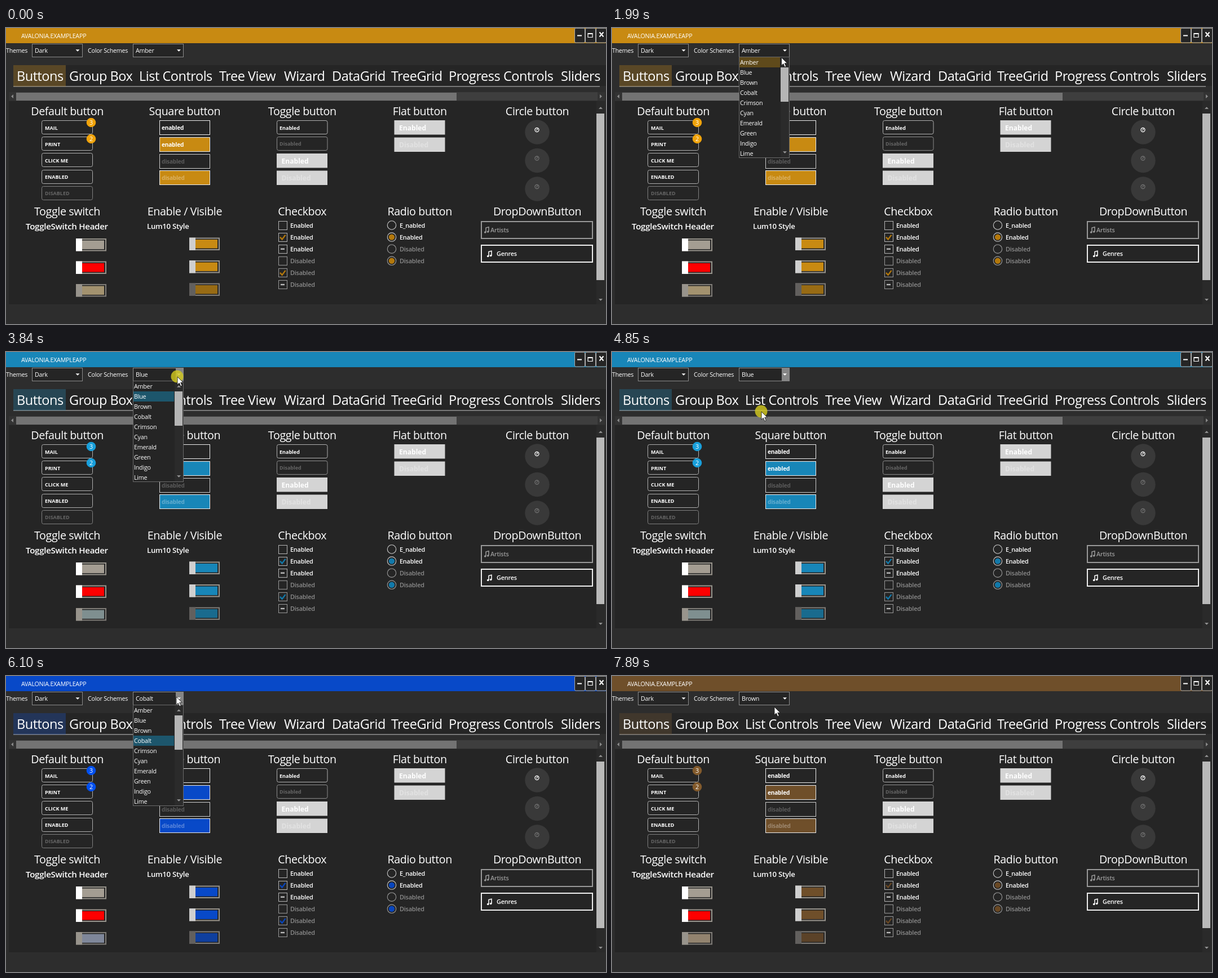
Animation, 1064 px wide and 526 px high, one loop 8 s. Source, as an HTML page:

```html
<!DOCTYPE html>
<html lang="en">
<head>
<meta charset="utf-8">
<title>Color schemes</title>
<style>
html, body { margin: 0; width: 100%; height: 100%; overflow: hidden; background: #2d2d2d; }
svg { display: block; width: 1064px; height: 526px; font-family: "Open Sans", "Noto Sans", sans-serif; }
text { fill: #fff; letter-spacing: -.02em; white-space: pre; }
.mid { text-anchor: middle; }
.head { font-size: 19.7px; }
.tab { font-size: 23.5px; }
.ui { font-size: 10.7px; font-weight: 500; }
.caps { font-size: 9px; font-weight: 700; letter-spacing: 0; }
.semi { font-size: 10.9px; font-weight: 600; }
.square { font-size: 10.1px; font-weight: 700; }
.flat { font-size: 12.1px; font-weight: 700; letter-spacing: 0; }
.title { font-size: 15.1px; font-weight: 600; }
.style { font-size: 13.2px; font-weight: 600; }
.main { fill: var(--main); }
.badge { fill: var(--badge); }
</style>
</head>
<body>
<svg id="stage" viewBox="0 0 1064 526"></svg>
<script>
const stage = document.getElementById('stage');

const rect = (x, y, w, h, attrs = '') =>
  `<rect x="${x}" y="${y}" width="${w}" height="${h}" ${attrs}/>`;
const frame = (x, y, w, h, color, fill = 'none', r = 0, line = 1) =>
  rect(x, y, w, h, `rx="${r}" fill="${fill}" stroke="${color}" stroke-width="${line}"`);
const text = (x, y, s, cls, color = '#fff') =>
  `<text x="${x}" y="${y}" class="${cls}" style="fill:${color}">${s}</text>`;
const disc = (x, y, r, attrs) => `<circle cx="${x}" cy="${y}" r="${r}" ${attrs}/>`;
const path = (d, attrs) => `<path d="${d}" ${attrs}/>`;
const caret = (x, y, dir, color, s = 3.5) =>
  path(`M${x - s} ${y - dir * s / 2}h${2 * s}l${-s} ${dir * s}z`, `fill="${color}"`);
const each = (list, fn) => list.map(fn).join('');

function windowChrome() {
  const buttons = each([1008, 1027, 1046], x => frame(x + .5, .5, 18, 25.5, '#a9a9a9', '#252525', 2));
  const glyphs = path('M1013 13.5h8', 'stroke="#fff" stroke-width="2"')
    + path('M1032 9.5h8v7h-8zM1032 10.5h8', 'fill="none" stroke="#fff" stroke-width="1.2"')
    + path('M1052.5 7.5l7 8m0-8l-7 8', 'stroke="#fff" stroke-width="2"');
  return rect(0, 0, 1064, 27, 'class="main"')
    + text(27, 18, 'AVALONIA.EXAMPLEAPP', 'ui') + buttons + glyphs;
}

function toolbar() {
  return text(0, 44, 'Themes', 'ui') + text(145, 44, 'Color Schemes', 'ui')
    + frame(46.5, 28.5, 89, 23, '#8c8c8c', '#252525') + text(51, 44, 'Dark', 'ui')
    + caret(127, 40, 1, '#fff')
    + frame(225.5, 28.5, 89, 23, '#8c8c8c', '#252525')
    + `<text id="scheme" class="ui" x="230" y="44"></text>`
    + rect(301, 29, 13.5, 22.5, 'id="hot" fill="#858585"') + caret(306.5, 40, 1, '#fff');
}

function tabs() {
  const labels = [[19, 'Buttons'], [112, 'Group Box'], [236, 'List Controls'], [378, 'Tree View'],
    [493, 'Wizard'], [578, 'DataGrid'], [683, 'TreeGrid'], [785, 'Progress Controls'], [984, 'Sliders']];
  return rect(13, 66, 1051, 37, 'fill="#252525"')
    + rect(13, 103, 1040, 1.6, 'fill="#8a8a8a"')
    + rect(13, 66, 93, 37, 'fill="#2d2d2d"')
    + rect(13, 66, 93, 38, 'class="main" opacity=".28"')
    + each(labels, ([x, s]) => text(x, 94, s, 'tab'));
}

function scrollBars() {
  return rect(5, 114, 1057, 15, 'fill="#333"') + rect(18, 114, 1031, 15, 'fill="#3e3e3e"')
    + rect(18, 115, 781, 14, 'fill="#737373"')
    + path('M13 118v7l-4-3.5zM1053 118v7l4-3.5z', 'fill="#888"')
    + rect(5, 130, 1057, 361, 'fill="#252525"')
    + rect(1047, 130, 15, 361, 'fill="#2a2a2a"') + rect(1047, 152, 14, 296, 'fill="#b9b9b9"')
    + caret(1054.5, 142, -1, '#999') + caret(1054.5, 483, 1, '#999');
}

function headings() {
  const rows = [['Default button', 'Square button', 'Toggle button', 'Flat button', 'Circle button'],
    ['Toggle switch', 'Enable / Visible', 'Checkbox', 'Radio button', 'DropDownButton']];
  return each(rows, (row, r) => each(row, (s, i) =>
    text(108.5 + i * 208.4, r ? 333 : 155, s, 'head mid')));
}

function pushButtons() {
  const names = ['MAIL', 'PRINT', 'CLICK ME', 'ENABLED', 'DISABLED'];
  const normal = each(names, (s, i) => {
    const y = 164.5 + i * 29.2, off = i == 4;
    return frame(63.5, Math.floor(y) + .5, 90, 24, off ? '#808080' : '#b0b0b0', '#252525', 3)
      + text(69, y + 16, s, 'caps', off ? '#666' : '#fff');
  });
  const badges = each([[168, 3], [197, 2]], ([y, n]) =>
    disc(151, y, 8.3, 'class="badge"') + text(151, y + 3.8, n, 'ui mid'));
  const square = each([164, 194, 224, 253], (y, i) =>
    frame(272.5, y + .5, 89, 25, i == 2 ? '#ccc' : '#eee', i % 2 ? 'var(--main)' : '#252525')
    + text(276, y + 17, i < 2 ? 'enabled' : 'disabled', 'square',
      i < 2 ? '#fff' : i == 2 ? '#5a5a5a' : 'rgba(255,255,255,.33)'));
  const toggle = each(['Enabled', 'Disabled'], (s, i) =>
    frame(480.5, 164.5 + i * 29, 89.5, 24, i ? '#8c8c8c' : '#b0b0b0', '#252525', 3)
    + text(485, 180.5 + i * 28.5, s, 'caps', i ? '#666' : '#fff'));
  const flat = each([[480, 223], [688.5, 164]], ([x, y]) =>
    each(['Enabled', 'Disabled'], (s, i) =>
      rect(x, y + i * 30.5, 90, 25.5, 'fill="#d4d4d4"')
      + text(x + 8.5, y + 17.5 + i * 30.5, s, 'flat', i ? '#e2e2e2' : '#fff')));
  const round = each([185, 235.5, 286], (y, i) => {
    const color = i ? '#727272' : '#fff';
    return disc(942, y, 21.7, 'fill="#393939"')
      + disc(941.5, y - 4, 3.5, `fill="none" stroke="${color}" stroke-width="1.3"`)
      + path(`M940.5 ${y - 3}l2.5-2.8`, `stroke="${color}" stroke-width="1.2"`);
  });
  return normal + badges + square + toggle + flat + round;
}

function toggleSwitch(x, y, fill, knob, edge = '#98948c') {
  return frame(x + 1, y + 1, 52, 20.5, edge, '#252525', 0, 2)
    + rect(x + 4, y + 3.5, 46, 15.5, `style="fill:${fill}"`)
    + rect(x, y, 11, 22.5, `fill="${knob}"`);
}

function switches() {
  return text(35, 358, 'ToggleSwitch Header', 'title') + text(250, 357, 'Lum10 Style', 'style')
    + toggleSwitch(124, 374, '#a49d92', '#fff')
    + toggleSwitch(124, 414.5, '#f00', '#fff')
    + toggleSwitch(124, 455, 'var(--pale)', '#98948c', '#807d78')
    + toggleSwitch(325, 372.5, 'var(--main)', '#cfcfcf')
    + toggleSwitch(325, 413, 'var(--main)', '#cfcfcf')
    + toggleSwitch(325, 453.5, 'var(--dim)', '#62605e', '#807d78');
}

function choices() {
  const marks = [
    () => '',
    y => path(`M486 ${y}l3.6 4 6-8`, 'fill="none" stroke="var(--mark)" stroke-width="2.4"'),
    y => path(`M487 ${y}h7`, 'stroke="#bbb" stroke-width="2.4"')
  ];
  const boxes = each([0, 1, 2, 3, 4, 5], i => {
    const y = 350.5 + i * 21.1, off = i > 2;
    return frame(483.5, Math.round(y) - 7.5, 15, 15, off ? '#999' : '#b5b5b5', '#252525')
      + marks[i % 3](y) + text(504, y + 4, off ? 'Disabled' : 'Enabled', 'semi', off ? '#8c8c8c' : '#fff');
  });
  const radios = each(['E_nabled', 'Enabled', 'Disabled', 'Disabled'], (s, i) => {
    const y = 350.5 + i * 21.1;
    return disc(684, y, 7.7, `fill="none" stroke="${i > 1 ? '#999' : '#ccc'}" stroke-width="1.1"`)
      + (i % 2 ? disc(684, y, 5.2, 'style="fill:var(--mark)"') : '')
      + text(698, y + 4, s, 'semi', i > 1 ? '#8c8c8c' : '#fff');
  });
  return boxes + radios;
}

function dropDowns() {
  const note = (x, y, color) =>
    path(`M${x + 3} ${y + 8}v-8l5-1.2v8`, `fill="none" stroke="${color}" stroke-width="1.5"`)
    + disc(x + 1.7, y + 8, 1.8, `fill="${color}"`) + disc(x + 6.7, y + 7, 1.8, `fill="${color}"`);
  return frame(843, 344, 197, 30, '#999', '#252525', 0, 2) + note(848, 355, '#999')
    + text(859, 363, 'Artists', 'semi', '#999')
    + frame(843, 386, 197, 30, '#eee', '#252525', 0, 2) + note(853, 397.5, '#fff')
    + text(870, 405, 'Genres', 'semi');
}

const colors = ['Amber', 'Blue', 'Brown', 'Cobalt', 'Crimson', 'Cyan', 'Emerald', 'Green', 'Indigo', 'Lime'];
function popup() {
  return '<g id="popup">' + frame(225.5, 51.5, 89, 179, '#6a6a6a', '#252525')
    + rect(299, 52, 15, 178, 'fill="#2b2b2b"') + rect(299, 70, 14, 61, 'fill="#b5b5b5"')
    + caret(306.5, 61, -1, '#999') + caret(306.5, 221, 1, '#999')
    + rect(226, 52, 72, 18, 'id="over" fill="#3f3f3f"') + rect(226, 52, 72, 18, 'id="picked"')
    + each(colors, (s, i) => text(227, 65 + i * 18.05, s, 'ui')) + '</g>';
}

stage.innerHTML = rect(0, 0, 1064, 526, 'fill="#2d2d2d"') + windowChrome() + toolbar() + tabs()
  + scrollBars() + headings() + pushButtons() + switches() + choices() + dropDowns() + popup()
  + disc(0, 0, 11, 'id="click" fill="#d2c81e" opacity=".82"')
  + path('M0 0v14.2l3.3-3.1 2.5 5.7 2.4-1-2.5-5.6h4.6z',
    'id="cursor" fill="#fff" stroke="#111" stroke-width=".8"');

const schemes = {
  Amber: { main: '#c88a12', badge: '#f0a30a', mark: '#b3780c', dim: '#986b14', pale: '#a3926f' },
  Blue: { main: '#1886b8', badge: '#189fdb', mark: '#1279aa', dim: '#196b8e', pale: '#7f8f90' },
  Cobalt: { main: '#0849c8', badge: '#0050ef', mark: '#0845bd', dim: '#0f3f9e', pale: '#7f879a' },
  Brown: { main: '#6f4f2a', badge: '#825a2c', mark: '#694824', dim: '#5b4228', pale: '#92836f' }
};
const changes = [[0, 'Amber'], [2840, 'Blue'], [5040, 'Cobalt'], [7200, 'Brown']];
const opened = [[1590, 2680], [3690, 4780], [5940, 7100]];
const clicks = [[1430, 1670], [2600, 2760], [3610, 3940], [4700, 4930], [5780, 6020], [6950, 7100]];
// start, end, steps, waypoints
const moves = [
  [200, 440, 4, [[832, 443], [431, 167]]],
  [590, 1360, 11, [[410, 140], [345, 60], [305, 2], [312, 25], [316, 50], [308, 38]]],
  [1430, 2220, 11, [[308, 37], [308, 37], [308, 37], [304, 45], [297, 60], [290, 75]]],
  [2320, 2450, 3, [[286, 75], [279, 76]]],
  [3140, 3460, 5, [[300, 85], [345, 78], [362, 58], [335, 48], [306, 45]]],
  [3610, 4010, 5, [[304, 44], [304, 44]]],
  [4240, 4540, 5, [[300, 52], [290, 72], [280, 92], [270, 112], [265, 106]]],
  [5310, 6100, 11, [[310, 85], [362, 60], [318, 42], [302, 37], [302, 37], [302, 37]]],
  [6250, 6720, 7, [[300, 48], [290, 65], [272, 85], [258, 101]]],
  [7420, 7890, 7, [[240, 95], [230, 80], [300, 75], [362, 65], [325, 58], [300, 55], [288, 55]]]
];

const within = (spans, t) => spans.some(([a, b]) => t >= a && t < b);
const latest = (list, t) => list.filter(m => m[0] <= t).pop();

function pointer(t) {
  const move = latest(moves, t);
  if (!move) return null;
  const [start, end, steps, pts] = move;
  const step = Math.min(steps - 1, Math.floor((t - start) / (end - start) * (steps - 1) + .15));
  const p = step / (steps - 1) * (pts.length - 1);
  const i = Math.min(pts.length - 2, Math.floor(p));
  return pts[i].map((v, k) => v + (pts[i + 1][k] - v) * (p - i));
}

const el = id => document.getElementById(id);
const show = (id, on) => el(id).setAttribute('visibility', on ? 'visible' : 'hidden');
const place = (id, [x, y]) => el(id).setAttribute('transform', `translate(${x} ${y})`);

function draw(t) {
  const name = latest(changes, t)[1];
  for (const key in schemes[name]) stage.style.setProperty('--' + key, schemes[name][key]);
  el('scheme').textContent = name;

  const pos = pointer(t), open = within(opened, t);
  const closing = opened.some(([, end], i) => t >= end && t < changes[i + 1][0]);
  const inCombo = pos && pos[0] > 225 && pos[0] < 315 && pos[1] > 28 && pos[1] < 52;
  show('hot', inCombo || closing);
  show('popup', open);
  show('cursor', pos);
  show('click', within(clicks, t));
  if (pos) {
    place('cursor', pos);
    place('click', [pos[0] - .5, pos[1] - .5]);
    const row = Math.floor((pos[1] - 52) / 18);
    show('over', open && row >= 0 && pos[0] < 299);
    place('over', [0, row * 18]);
  }
  place('picked', [0, colors.indexOf(name) * 18]);
  el('picked').setAttribute('fill', name == 'Amber' ? '#5f4a1b' : '#1d566c');
}

const began = performance.now();
function tick() {
  draw((performance.now() - began) % 8000);
  requestAnimationFrame(tick);
}
tick();
</script>
</body>
</html>
```
